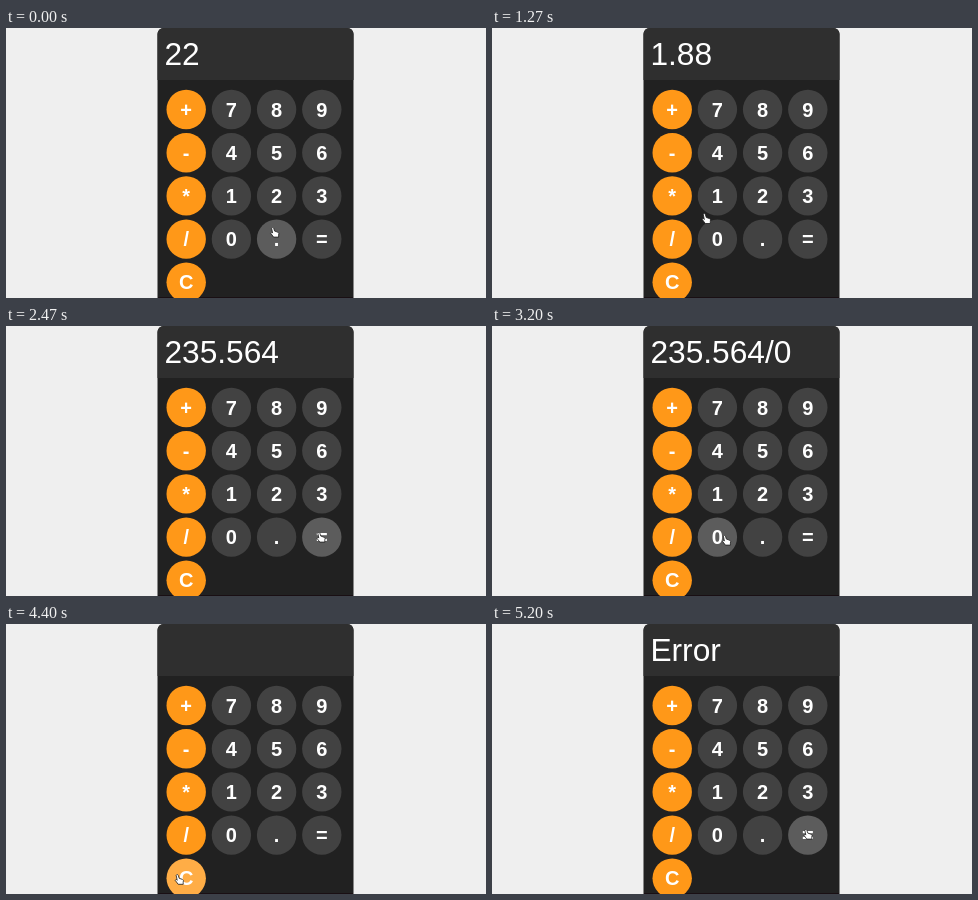
An HTML page that plays this animation: 480x270 px, repeating every 5.34 s.

```html
<!DOCTYPE html>
<html lang="en">
<head>
<meta charset="utf-8">
<title>Calculator</title>
<style>
  html, body { margin: 0; width: 100%; height: 100%; overflow: hidden; background: #efefef; }
  svg { display: block; width: 100vw; height: 100vh; }
  text { fill: #fff; font-family: "Liberation Sans", Arial, sans-serif; }
  .key text { font-size: 20px; font-weight: bold; text-anchor: middle; }
  .key circle { fill: #424242; }
  .key.hover circle { fill: #5c5c5c; }
  .key.op circle { fill: #ff9818; }
  .key.op.hover circle { fill: #ffad46; }
  #display { font-size: 31.7px; white-space: pre; }
</style>
</head>
<body>
<svg viewBox="0 0 480 270">
  <rect x="151.5" y="0" width="196" height="290" rx="6" fill="#212121"/>
  <path d="M151.5 52V6a6 6 0 0 1 6-6h184a6 6 0 0 1 6 6v46z" fill="#2f2f2f"/>
  <rect x="152" y="269" width="195" height="1" fill="#190f13"/>
  <text id="display" x="158.4" y="37"></text>
  <g id="keys"></g>
  <path id="hand" d="M-3-4Q-2-6-1-4L0-1 3 0Q5 1 4 3L4 5H-1L-4 1Q-3-1-2 1Z"
    fill="#fff" stroke="#1c1c1c" stroke-width=".8" stroke-linejoin="round"/>
</svg>
<script>
const LOOP = 5340;
const RADIUS = 19.7;
const LAYOUT = ["+789", "-456", "*123", "/0.=", "C"];

// Pointer stops: [arrival tick, key, press tick (0 = none), dx, dy], 15 ticks per second
const STOPS = [
  [0, ".", 1, -2, -7], [3, "5", 4], [5, "6", 6], [8, "/", 9],
  [10, "1", 0, -7, 14], [11, "1", 12], [13, "2", 14], [16, "=", 17],
  [18, "0", 0, 23, -3], [20, "*", 21], [23, "1", 24], [25, "2", 26],
  [27, "5", 28, -2, 12], [30, ".", 0, 1, 37], [31, ".", 32], [33, "3", 34],
  [35, "=", 0, 0, -9], [36, "=", 37, -1, 0], [38, "=", 0, -1, 0],
  [40, "/", 43], [45, "0", 48, 9, 3], [50, "=", 55, 0, 0],
  [63, "C", 0, 19, 8], [64, "C", 66, -7, 1], [69, "3", 70], [72, "*", 73],
  [75, "/", 75], [77, "=", 78, 0, -1]
];

const display = document.getElementById("display");
const hand = document.getElementById("hand");

function add(parent, tag, attrs) {
  const node = document.createElementNS("http://www.w3.org/2000/svg", tag);
  for (const name in attrs) node.setAttribute(name, attrs[name]);
  return parent.appendChild(node);
}

const keys = {};
LAYOUT.forEach((row, r) => [...row].forEach((label, c) => {
  const x = 180.2 + 45.2 * c, y = 81.5 + 43.2 * r;
  const node = add(document.getElementById("keys"), "g", { class: c ? "key" : "key op" });
  add(node, "circle", { cx: x, cy: y, r: RADIUS });
  add(node, "text", { x, y: y + 7 }).textContent = label;
  keys[label] = { node, x, y };
}));

function evaluate(sum) {
  const parts = sum.match(/^([\d.]+)([-+*/])([\d.]+)$/);
  if (!parts) return "Error";
  const a = +parts[1], b = +parts[3];
  const result = { "+": a + b, "-": a - b, "*": a * b, "/": a / b }[parts[2]];
  return String(+result.toPrecision(10));
}

function press(text, key) {
  if (key === "C") return "";
  return key === "=" ? evaluate(text) : text + key;
}

function textAt(tick) {
  return STOPS.filter(stop => stop[2] && stop[2] <= tick)
    .reduce((text, stop) => press(text, stop[1]), "22");
}

function place([, key, , dx = 0, dy = 5]) {
  return [keys[key].x + dx, keys[key].y + dy];
}

// Rest at a stop until its press, then glide to the next one
function pointerAt(tick) {
  const i = STOPS.findLastIndex(stop => stop[0] <= tick);
  const from = STOPS[i], to = STOPS[i + 1] || from;
  const leave = Math.max(from[0], from[2]);
  const k = tick > leave ? (tick - leave) / (to[0] - leave) : 0;
  const [x, y] = place(from), [toX, toY] = place(to);
  return [x + (toX - x) * k, y + (toY - y) * k];
}

function draw(ms) {
  // Ticks fall on whole hundredths of a second
  const tick = Math.min(78, Math.floor((Math.floor(ms / 10) + 0.34) * 0.15));
  const [x, y] = pointerAt(tick);
  display.textContent = textAt(tick);
  hand.setAttribute("transform", `translate(${x} ${y})`);
  for (const key of Object.values(keys)) {
    key.node.classList.toggle("hover", Math.hypot(x - key.x, y - key.y) < RADIUS);
  }
}

const start = performance.now();
function loop() {
  draw((performance.now() - start) % LOOP);
  requestAnimationFrame(loop);
}
loop();
</script>
</body>
</html>
```
